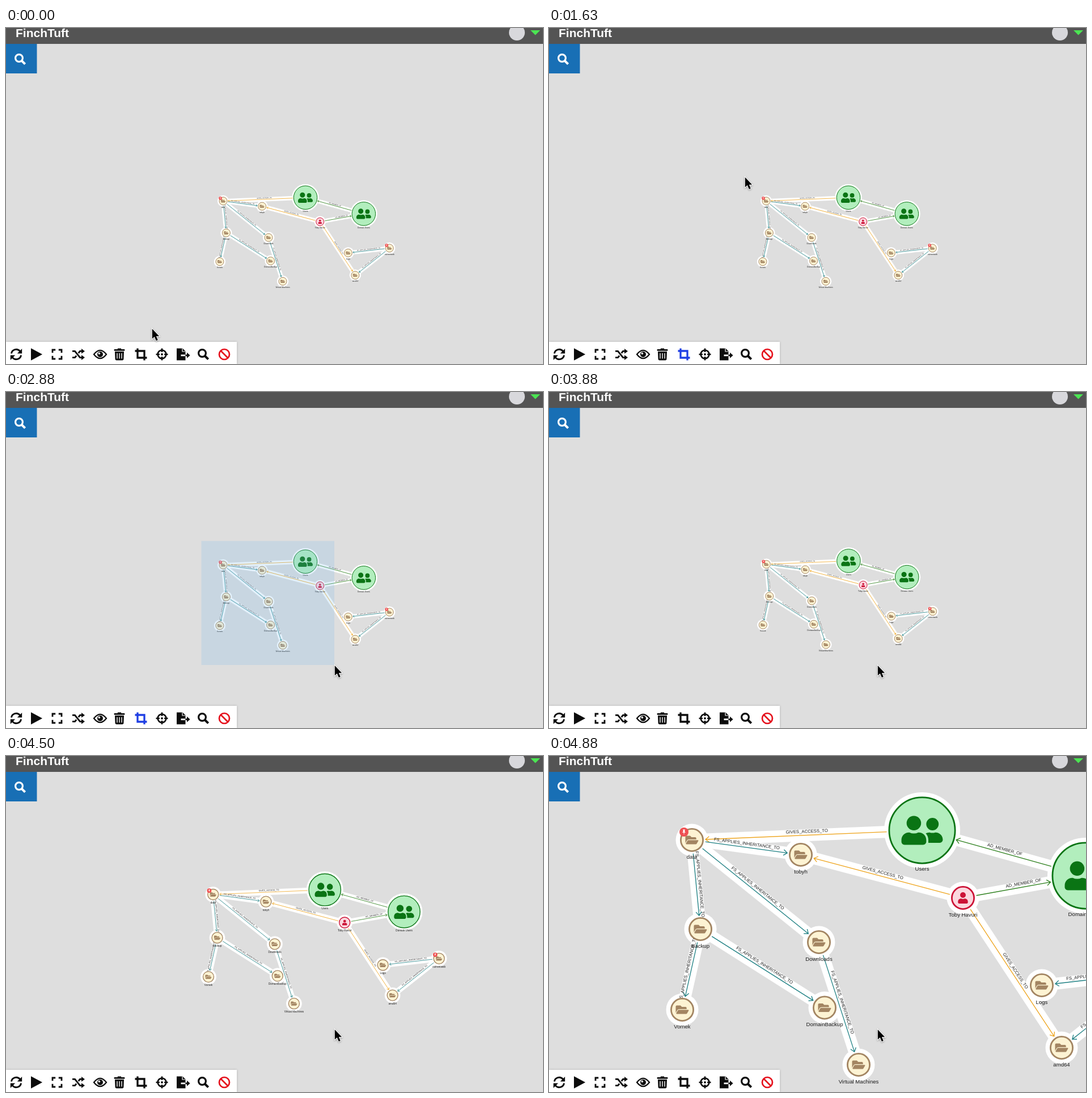
Animation of 947 by 592 pixels, one loop 6000 ms. Source, as an HTML page with a canvas:

```html
<!DOCTYPE html>
<html lang="en">
<head>
<meta charset="utf-8">
<title>Graph crop and zoom</title>
<style>
html, body { margin: 0; width: 100%; height: 100%; overflow: hidden; background: #dedede; }
canvas { display: block; }
</style>
</head>
<body>
<canvas id="stage" width="947" height="592"></canvas>
<script>
const ctx = document.getElementById('stage').getContext('2d');
const W = 947, H = 592, LOOP = 6000, STEP = 125;
const FONT = '"Liberation Sans", Arial, sans-serif';
const BLACK = '#0c0c0c', BLUE = '#1f3fe4', RED = '#e5101c';

// Graph, in coordinates of the fully zoomed view
const node = (x, y, label, kind = 'folder', pinned = false) =>
  ({ x, y, label, kind, pinned, r: kind === 'group' ? 59.5 : 21 });

const nodes = {
  data: node(252, 148, 'data', 'folder', true),
  home: node(444, 174, 'tobyh'),
  users: node(658, 131, 'Users', 'group'),
  domain: node(946, 211, 'Domain Users', 'group'),
  person: node(730, 250, 'Toby Havuri', 'person'),
  backup: node(267, 305, 'Backup'),
  downloads: node(476, 328, 'Downloads'),
  vendor: node(235, 447, 'Vomek'),
  domainBackup: node(486, 443.5, 'DomainBackup'),
  machines: node(546, 544, 'Virtual Machines'),
  logs: node(869, 404, 'Logs'),
  amd64: node(904, 514, 'amd64'),
  web: node(1073, 380.5, 'currentweb', 'folder', true)
};

const kinds = {
  folder: { fill: '#fdf3d3', line: '#a38562' },
  person: { fill: '#fbd7de', line: '#cc1236' },
  group: { fill: '#b2eebd', line: '#0a7414' }
};

const relations = {
  access: { text: 'GIVES_ACCESS_TO', color: '#eea41c' },
  member: { text: 'AD_MEMBER_OF', color: '#2c7f1c' },
  inherit: { text: 'FS_APPLIES_INHERITANCE_TO', color: '#1c7f82' }
};

const edges = [
  ['users', 'data', 'access'], ['person', 'home', 'access'], ['person', 'amd64', 'access'],
  ['person', 'domain', 'member'], ['domain', 'users', 'member'],
  ['data', 'home', 'inherit'], ['data', 'backup', 'inherit'], ['data', 'downloads', 'inherit'],
  ['backup', 'vendor', 'inherit'], ['backup', 'domainBackup', 'inherit'],
  ['downloads', 'machines', 'inherit'], ['web', 'logs', 'inherit'], ['web', 'amd64', 'inherit']
].map(([from, to, type]) => ({ a: nodes[from], b: nodes[to], ...relations[type] }));

const folderIcon = new Path2D('M573 292L500 416a48 48 0 0 1-41 24H45c-18 0-30-20-21-36l73-124a48 48 0 0 1 41-24h414c18 0 30 20 21 36z' +
  'M152 224h328v-48c0-26-22-48-48-48H272l-64-64H48C22 64 0 86 0 112v278l70-119c17-29 48-47 82-47z');
const personIcon = new Path2D('M224 256a128 128 0 1 0 0-256 128 128 0 0 0 0 256z' +
  'm90 32h-17a174 174 0 0 1-146 0h-17C60 288 0 348 0 422v42c0 26 21 48 48 48h352c26 0 48-22 48-48v-42c0-74-60-134-134-134z');
const groupIcon = new Path2D('M192 256a112 112 0 1 0 0-224 112 112 0 0 0 0 224z' +
  'm77 32h-8a158 158 0 0 1-137 0h-9C52 288 0 340 0 403v29c0 26 21 48 48 48h288c26 0 48-22 48-48v-29c0-63-52-115-115-115z' +
  'M480 256a96 96 0 1 0 0-192 96 96 0 0 0 0 192zm48 32h-4a136 136 0 0 1-88 0h-4q-30 0-56 15c25 27 40 62 40 100v45h176c26 0 48-22 48-48 0-62-50-112-112-112z');
const pinIcon = new Path2D('M104 32h176v64h-30l12 120q60 30 60 72H60q0-42 60-72l12-120h-28zM170 288h44v120l-22 50-22-50z');
const arrowCursor = new Path2D('M0 0V17.6L4 14L7 21L10 19.7L7.1 13H12.3Z');

function at(x, y, draw, angle = 0, scale = 1) {
  ctx.save();
  ctx.translate(x, y);
  ctx.rotate(angle);
  ctx.scale(scale, scale);
  draw();
  ctx.restore();
}

function disc(x, y, r, fill, line, width) {
  ctx.beginPath();
  ctx.arc(x, y, r, 0, Math.PI * 2);
  if (fill) { ctx.fillStyle = fill; ctx.fill(); }
  if (line) { ctx.strokeStyle = line; ctx.lineWidth = width; ctx.stroke(); }
}

function box(x, y, w, h, color) {
  ctx.fillStyle = color;
  ctx.fillRect(x, y, w, h);
}

function fillPath(d, color) {
  ctx.fillStyle = color;
  ctx.fill(new Path2D(d));
}

function strokePath(d, color, width) {
  ctx.strokeStyle = color;
  ctx.lineWidth = width;
  ctx.stroke(new Path2D(d));
}

function glyph(path, x, y, w, h, scale, color) {
  at(x, y, () => {
    ctx.translate(-w / 2, -h / 2);
    ctx.fillStyle = color;
    ctx.fill(path);
  }, 0, scale);
}

function text(str, x, y, size, color = '#1c1c1c', align = 'center', weight = '') {
  ctx.font = `${weight} ${size}px ${FONT}`;
  ctx.textAlign = align;
  ctx.fillStyle = color;
  ctx.fillText(str, x, y);
}

function drawEdge({ a, b, text: label, color }, zoom) {
  const angle = Math.atan2(b.y - a.y, b.x - a.x);
  const length = Math.hypot(b.x - a.x, b.y - a.y);
  const tip = length - b.r - 3;
  at(a.x, a.y, () => {
    strokePath(`M${a.r + 3} 0H${tip}M${tip - 6.5} -5L${tip} 0L${tip - 6.5} 5`, color, Math.max(1.3, 0.75 / zoom));
  }, angle);
  const upright = Math.abs(angle) > Math.PI / 2 ? angle + Math.PI : angle;
  at((a.x + b.x) / 2, (a.y + b.y) / 2, () => text(label, 0, -4.2, 7.7), upright);
}

function drawNode({ x, y, r, kind, label, pinned }) {
  const { fill, line } = kinds[kind];
  disc(x, y, r - 1.4, fill, line, 2.8);
  if (kind === 'folder') glyph(folderIcon, x, y, 576, 504, 0.04, line);
  if (kind === 'person') glyph(personIcon, x, y, 448, 512, 0.039, line);
  if (kind === 'group') glyph(groupIcon, x, y, 640, 512, 0.114, line);
  if (pinned) {
    disc(x - 14, y - 14, 8, '#ef5052');
    glyph(pinIcon, x - 14, y - 14, 384, 490, 0.021, '#fff');
  }
  text(label, x, y + r + 11.8, 9.6);
}

function drawGraph({ x, y, zoom }) {
  ctx.save();
  ctx.translate(x, y);
  ctx.scale(zoom, zoom);
  const all = Object.values(nodes);
  for (const { a, b } of edges) strokePath(`M${a.x} ${a.y}L${b.x} ${b.y}`, '#fff', 21);
  for (const n of all) disc(n.x, n.y, n.r + 7.5, '#fff');
  for (const e of edges) drawEdge(e, zoom);
  all.forEach(drawNode);
  ctx.restore();
}

function searchIcon(color) {
  disc(-2, -2, 6.4, null, color, 3.2);
  strokePath('M3 3L8.7 8.7', color, 4);
}

const toolbar = [
  [18, c => {
    for (const turn of [0, Math.PI]) at(0, 0, () => {
      strokePath('M-8.6 -1.5A8.7 8.7 0 0 1 6.6 -5.6', c, 2.9);
      fillPath('M10.2 -10V-1.6H1.8Z', c);
    }, turn);
  }],
  [53, c => { fillPath('M-8 -9.5L9 0L-8 9.5Z', c); strokePath('M-8 -9L9 0L-8 9Z', c, 2); }],
  [90, c => {
    for (let i = 0; i < 4; i++) at(0, 0, () => strokePath('M-8 -2.8V-8H-2.8', c, 2.8), i * Math.PI / 2);
  }],
  [128, c => {
    strokePath('M-11 -5.6H-6.5L2.5 5.6H6M-11 5.6H-6.5L-3.8 2.4M-.3 -2.2L2.5 -5.6H6', c, 2.9);
    fillPath('M5 -10L11 -5.6L5 -1.2ZM5 10L11 5.6L5 1.2Z', c);
  }],
  [166, c => {
    strokePath('M-11 0Q0 -14.4 11 0Q0 14.4 -11 0Z', c, 2.2);
    disc(0, 0, 5, c);
    disc(-1.6, -1.6, 1.8, '#fff');
  }],
  [200, c => {
    box(-9.3, -9, 18.6, 2.8, c);
    box(-3.2, -10.5, 6.4, 2, c);
    fillPath('M-8 -5H8L7.4 8.5Q7.2 10.5 5.2 10.5H-5.2Q-7.2 10.5 -7.4 8.5Z', c);
    strokePath('M-4 -2V7.5M0 -2V7.5M4 -2V7.5', '#fff', 1.4);
  }],
  [238, c => strokePath('M-6 -10.5V6H10.5M-10.5 -6H6V10.5', c, 3.3)],
  [275, c => {
    disc(0, 0, 7.4, null, c, 2.6);
    strokePath('M0 -10.5V-4M0 10.5V4M-10.5 0H-4M10.5 0H4', c, 2.6);
    disc(0, 0, 1.9, c);
  }],
  [312, c => {
    fillPath('M-11 -10.5H-.5L4.5 -5.5V10.5H-11Z', c);
    strokePath('M-1 -10.5V-5H4.5', '#fff', 1.2);
    strokePath('M-3.5 1.8H4.5', '#fff', 2.8);
    strokePath('M4.5 1.8H8', c, 2.8);
    fillPath('M7 -3.2L12.6 1.8L7 6.8Z', c);
  }],
  [348, searchIcon],
  [385, () => { disc(0, 0, 9, null, RED, 2.7); strokePath('M-6.2 -6.2L6.2 6.2', RED, 2.7); }]
];
const CROP_X = 238;

function drawChrome(cropActive) {
  box(0, 0, W, 28, '#545454');
  text('FinchTuft', 17, 16, 21, '#fff', 'left', 'bold');
  disc(901, 8, 14, '#d8d8dc');
  fillPath('M925 4H942L933.5 12.5Z', '#4be552');
  box(0, 28, 54.5, 52, '#186fb5');
  at(25, 55, () => searchIcon('#fff'));

  ctx.save();
  ctx.shadowColor = 'rgba(0,0,0,.2)';
  ctx.shadowBlur = 4;
  box(0, 553, 407, 39, '#fff');
  ctx.restore();
  for (const [x, draw] of toolbar) {
    at(x, 575, () => draw(cropActive && x === CROP_X ? BLUE : BLACK));
  }
}

// Pointer path: time, x, y
const pointerPath = [
  [0, 257, 529], [125, 250, 553], [250, 238, 574], [875, 238, 574],
  [1000, 241, 568], [1125, 262, 500], [1250, 330, 330], [1375, 383, 238], [1500, 352, 258],
  [1625, 345, 262], [2000, 345, 262],
  [2125, 372, 290], [2250, 470, 370], [2375, 600, 450], [2500, 660, 488],
  [2625, 577, 474], [2750, 578, 479], [2875, 579, 481], [LOOP, 579, 481]
];

function pointerAt(t) {
  const i = pointerPath.findIndex(p => p[0] > t);
  const [t0, x0, y0] = pointerPath[i - 1], [t1, x1, y1] = pointerPath[i];
  const f = (t - t0) / (t1 - t0);
  return { x: x0 + (x1 - x0) * f, y: y0 + (y1 - y0) * f };
}

function drawPointer({ x, y }) {
  at(x + 0.8, y + 1, () => {
    ctx.save();
    ctx.shadowColor = 'rgba(0,0,0,.35)';
    ctx.shadowBlur = 3;
    ctx.shadowOffsetY = 1;
    ctx.strokeStyle = '#fff';
    ctx.lineWidth = 2;
    ctx.stroke(arrowCursor);
    ctx.restore();
    ctx.fillStyle = '#000';
    ctx.fill(arrowCursor);
  });
}

function ease(t, start) {
  const p = Math.min(1, Math.max(0, (t - start) / 500));
  return p < 0.5 ? 4 * p ** 3 : 1 - 4 * (1 - p) ** 3;
}

// The selection is first centred, then enlarged about that centre
function viewAt(t) {
  const small = 1 / 2.8, centre = { x: 472, y: 334.5 };
  const zoom = small + (1 - small) * ease(t, 4316);
  const rest = 1 - ease(t, 3773);
  return { x: centre.x * (1 - zoom) - 10.4 * rest, y: centre.y * (1 - zoom) + 37 * rest, zoom };
}

function render(t) {
  const pointer = pointerAt(t);
  box(0, 0, W, H, '#dedede');
  drawGraph(viewAt(t));
  if (t >= 2125 && t < 3875) {
    box(344.5, 262.5, pointer.x - 344.5, pointer.y - 262.5, 'rgba(110,178,232,.2)');
  }
  drawChrome(t >= 250 && t < 3875);
  drawPointer(pointer);
}

const origin = performance.now();
function tick() {
  const t = (performance.now() - origin) % LOOP;
  render(Math.floor(t / STEP) * STEP);
  requestAnimationFrame(tick);
}
tick();
</script>
</body>
</html>
```
